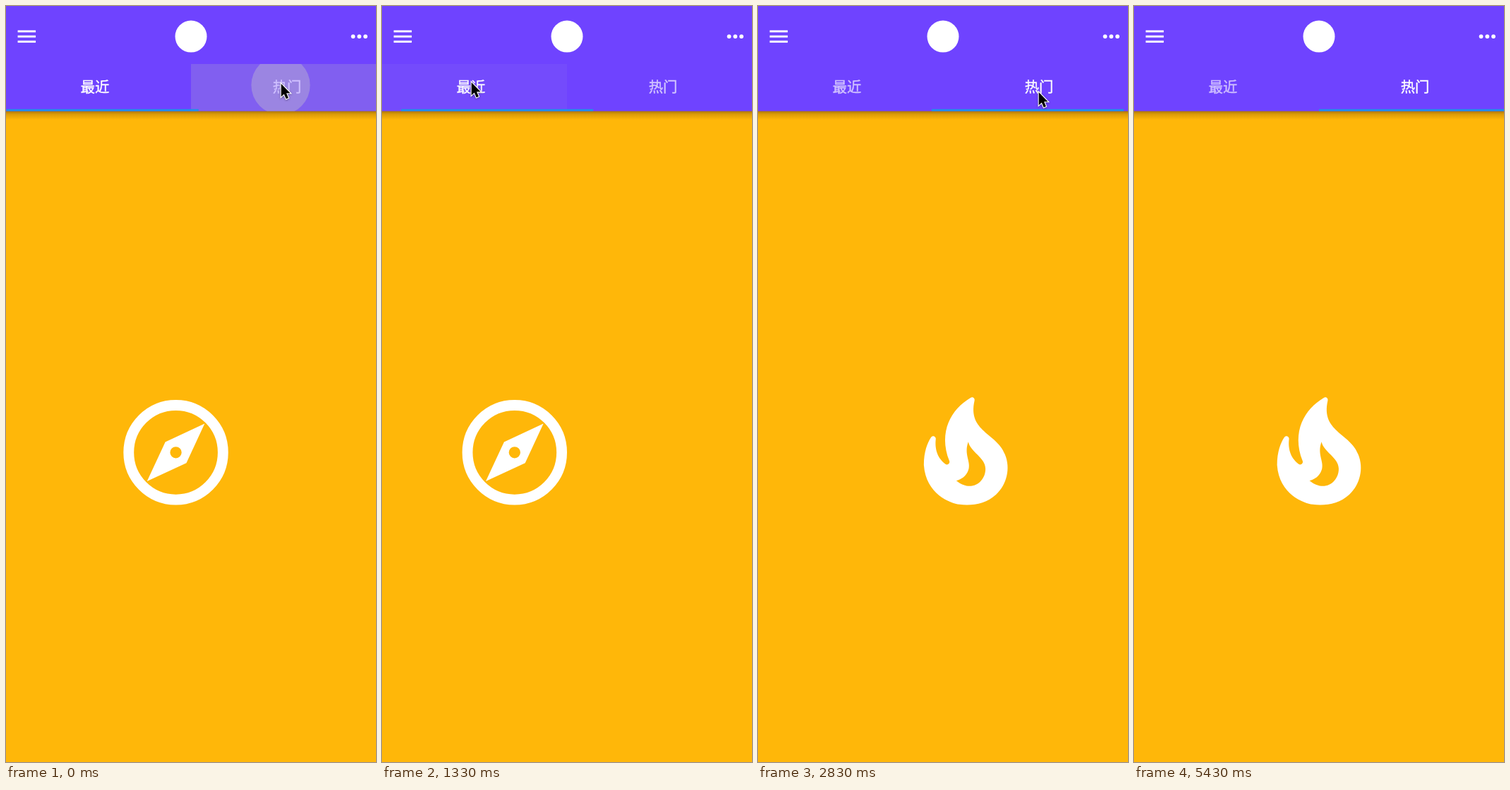
An HTML page with a canvas that plays this animation: 524x1069 px, repeating every 5510 ms.

```html
<!DOCTYPE html>
<html lang="zh">
<head>
<meta charset="utf-8">
<style>
  html, body { margin: 0; width: 100%; height: 100%; overflow: hidden; background: #ffb709; }
  canvas { display: block; }
</style>
</head>
<body>
<canvas id="stage" width="524" height="1069"></canvas>
<script>
const ctx = document.getElementById('stage').getContext('2d');
const LOOP = 5510, W = 524, H = 1069;
const BAR_TOP = 82, BAR_BOTTOM = 148.7;
const TAB_PITCH = 272, PAGE_PITCH = 544, DP = 1.456, ICON = 7.42;
const SLIDE_MS = 300, FADE_MS = 200;

const taps = [
  { at: -17, tab: 1, x: 389, y: 112, hold: 130 },
  { at: 1159, tab: 0, x: 127, y: 109, hold: 30 },
  { at: 2620, tab: 1, x: 397, y: 123, hold: 95 },
];

// time, x, y of the pointer tip
const pointerKeys = [
  [0, 389, 109], [200, 389, 109], [530, 219, 104], [780, 126, 107],
  [1700, 126, 107], [1870, 318.5, 121], [2080, 420, 122], [2270, 420, 122],
  [2500, 397, 121], [2850, 397, 121], [3200, 542, 190], [LOOP, 542, 190],
];

const flame = new Path2D(
  'M19.48 12.35c-1.57-4.08-7.16-4.3-5.81-10.23c.1-.44-.37-.78-.75-.55' +
  'C9.29 3.71 6.68 8 8.87 13.62c.18.46-.36.89-.75.59c-1.81-1.37-2-3.34-1.84-4.75' +
  'c.06-.52-.62-.77-.91-.34C4.69 10.16 4 11.84 4 14.37c.38 5.6 5.11 7.32 6.81 7.54' +
  'c2.43.31 5.06-.14 6.95-1.87C19.84 18.11 20.6 15.03 19.48 12.35z' +
  'M10.2 17.38c1.44-.35 2.18-1.39 2.38-2.31c.33-1.43-.96-2.83-.09-5.09' +
  'c.33 1.87 3.27 3.04 3.27 5.08C15.84 17.59 13.1 19.76 10.2 17.38z');
const needle = new Path2D(
  'M6.5 17.5l7.51-3.49L17.5 6.5 9.99 9.99zM13.1 12a1.1 1.1 0 1 0-2.2 0a1.1 1.1 0 1 0 2.2 0z');
const arrow = new Path2D('M0 0V18.2L4.1 14.5 7 21.3 10.2 19.9 7.4 13.2H12.8Z');

const clamp = v => Math.max(0, Math.min(1, v));

// cubic-bezier(.25, .1, .25, 1)
function ease(x) {
  let lo = 0, hi = 1;
  const curve = (s, a, b) => 3 * s * (1 - s) ** 2 * a + 3 * s * s * (1 - s) * b + s ** 3;
  for (let i = 0; i < 24; i++) {
    const mid = (lo + hi) / 2;
    if (curve(mid, 0.25, 0.25) < x) lo = mid; else hi = mid;
  }
  return curve(lo, 0.1, 1);
}

function pagePosition(t) {
  let page = 0;
  for (const tap of taps)
    if (t >= tap.at) page += (tap.tab - page) * ease(clamp((t - tap.at) / SLIDE_MS));
  return page;
}

function pointerAt(t) {
  const k = pointerKeys;
  let i = 0;
  while (i < k.length - 2 && t >= k[i + 1][0]) i++;
  const span = k[i + 1][0] - k[i][0], u = (t - k[i][0]) / span;
  const slope = (j, c) => {
    const a = k[j - 1], b = k[j], d = k[j + 1];
    if (!a || !d || (b[c] - a[c]) * (d[c] - b[c]) <= 0) return 0;
    return (d[c] - a[c]) / (d[0] - a[0]);
  };
  return [1, 2].map(c =>
    k[i][c] * (1 + 2 * u) * (1 - u) ** 2 + k[i + 1][c] * u * u * (3 - 2 * u) +
    span * (slope(i, c) * u * (1 - u) ** 2 - slope(i + 1, c) * u * u * (1 - u)));
}

function disc(x, y, r, fill) {
  ctx.fillStyle = fill;
  ctx.beginPath();
  ctx.arc(x, y, r, 0, 7);
  ctx.fill();
}

function pageIcon(x, draw) {
  ctx.save();
  ctx.translate(x, 631.3);
  ctx.scale(ICON, ICON);
  ctx.translate(-12, -12);
  ctx.fillStyle = ctx.strokeStyle = '#fff';
  draw();
  ctx.restore();
}

function drawPages(page) {
  const x = W / 2 - page * PAGE_PITCH;
  pageIcon(x, () => {
    ctx.lineWidth = 2;
    ctx.beginPath();
    ctx.arc(12, 12, 9, 0, 7);
    ctx.stroke();
    ctx.fill(needle, 'evenodd');
  });
  pageIcon(x + PAGE_PITCH, () => ctx.fill(flame, 'evenodd'));
}

function drawInk(t) {
  for (const { at, tab, x, y, hold } of taps) {
    const since = t - at;
    if (since < -hold || since > FADE_MS) continue;
    const released = Math.max(0, since);
    const held = Math.min(hold, since + hold);
    const glow = 0.4 * clamp((held - released) / FADE_MS);
    ctx.save();
    ctx.beginPath();
    ctx.rect(tab * W / 2, BAR_TOP, W / 2, BAR_BOTTOM - BAR_TOP);
    ctx.clip();
    ctx.fillStyle = `rgba(188,188,188,${glow})`;
    ctx.fillRect(0, BAR_TOP, W, BAR_BOTTOM - BAR_TOP);
    const radius = Math.min(152, held * 0.13 + released * DP);
    disc(x, y, radius, `rgba(200,200,200,${0.4 * (1 - released / FADE_MS)})`);
    ctx.restore();
  }
}

// A thin outline gives the labels their medium weight.
function drawLabel(text, x, strength) {
  const mix = c => Math.round(c + (255 - c) * strength);
  ctx.fillStyle = ctx.strokeStyle = `rgb(${mix(111)},${mix(67)},255)`;
  ctx.lineWidth = 0.45;
  ctx.fillText(text, x, 122);
  ctx.strokeText(text, x, 122);
}

function drawBar(t, page) {
  const shadow = ctx.createLinearGradient(0, BAR_BOTTOM, 0, 161);
  shadow.addColorStop(0, 'rgba(60,30,0,.42)');
  shadow.addColorStop(0.35, 'rgba(60,30,0,.18)');
  shadow.addColorStop(1, 'rgba(60,30,0,0)');
  ctx.fillStyle = shadow;
  ctx.fillRect(0, 148, W, 13);
  ctx.fillStyle = '#6f43ff';
  ctx.fillRect(0, 0, W, BAR_BOTTOM);

  drawInk(t);

  ctx.fillStyle = '#fff';
  for (const row of [-1, 0, 1])
    ctx.fillRect(16.6, 43.1 + row * 5 * DP - DP, 17.5 * DP, 2 * DP);
  for (const col of [-1, 0, 1]) disc(500.3 + col * 6 * DP, 43.1, 2 * DP, '#fff');
  disc(W / 2, 43.1, 22.5, '#fff');

  ctx.font = '500 20.3px "Noto Sans CJK SC", "Noto Sans CJK", sans-serif';
  ctx.textAlign = 'center';
  ['最近', '热门'].forEach((label, i) =>
    drawLabel(label, 126 + i * TAB_PITCH, 1 - 0.35 * Math.abs(page - i)));

  ctx.fillStyle = '#2090ea';
  ctx.fillRect(page * TAB_PITCH - 10, BAR_BOTTOM - 2 * DP, TAB_PITCH, 2 * DP);
}

function drawPointer(t) {
  const [x, y] = pointerAt(t);
  ctx.save();
  ctx.translate(x + 0.7, y + 1);
  ctx.lineWidth = 2.2;
  ctx.strokeStyle = '#fff';
  ctx.shadowColor = 'rgba(0,0,0,.35)';
  ctx.shadowBlur = 3;
  ctx.shadowOffsetY = 1;
  ctx.stroke(arrow);
  ctx.shadowColor = 'transparent';
  ctx.fillStyle = '#000';
  ctx.fill(arrow);
  ctx.restore();
}

function draw(t) {
  const page = pagePosition(t);
  ctx.fillStyle = '#ffb709';
  ctx.fillRect(0, 0, W, H);
  drawPages(page);
  drawBar(t, page);
  drawPointer(t);
}

let start;
function tick(now) {
  start ??= now;
  draw((now - start) % LOOP);
  requestAnimationFrame(tick);
}
draw(0);
requestAnimationFrame(tick);
</script>
</body>
</html>
```
